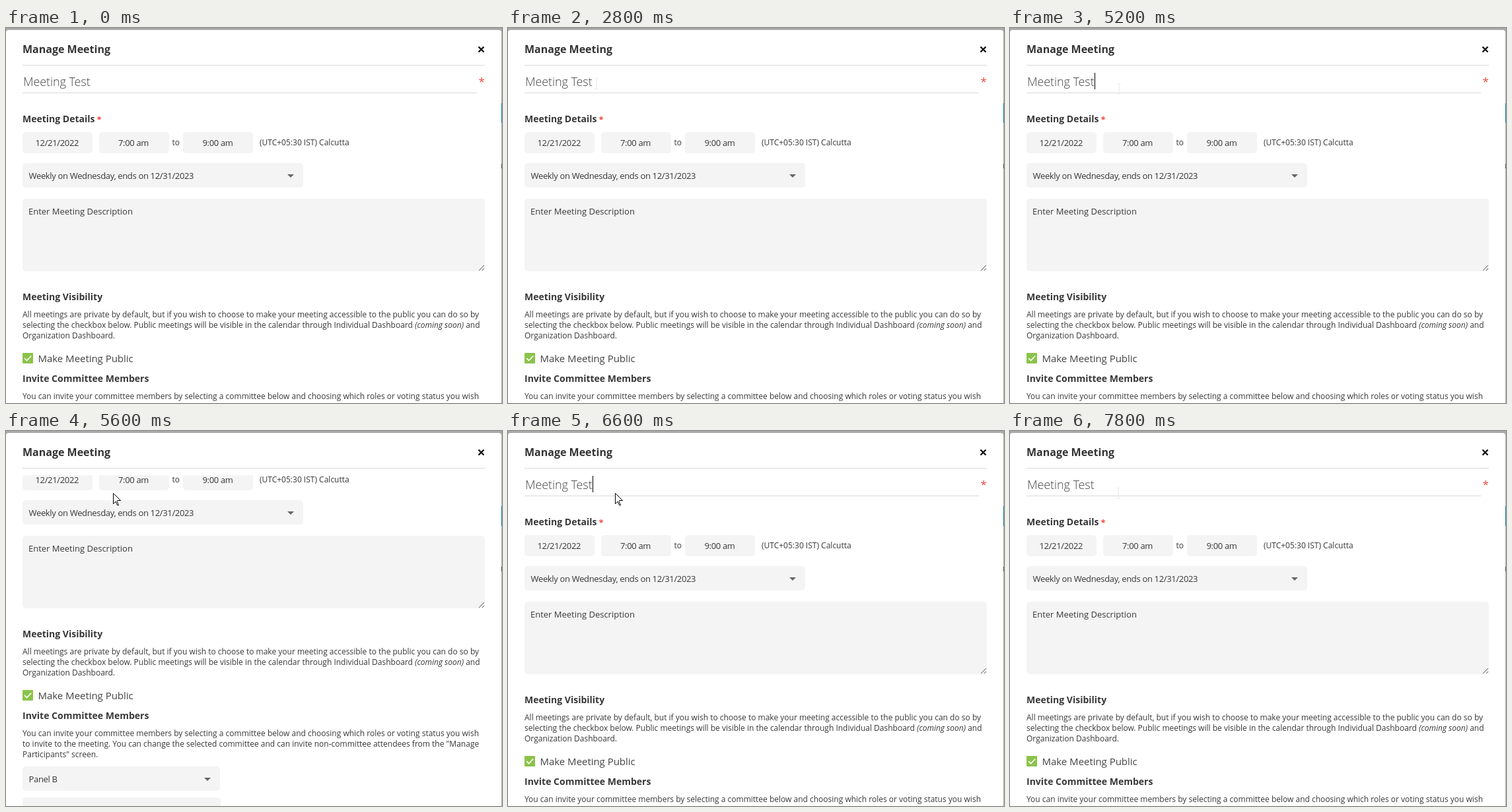
An HTML page that plays this animation: 751x569 px, repeating every 8000 ms.

```html
<!DOCTYPE html>
<html lang="en">
<head>
<meta charset="utf-8">
<title>Manage Meeting</title>
<style>
html, body { margin: 0; width: 100%; height: 100%; overflow: hidden; background: #fff; }
svg { display: block; width: 751px; height: 569px; }
text { font: 12px "Open Sans", sans-serif; fill: #383838; white-space: pre; }
.title { font-size: 16px; font-weight: 700; fill: #333; }
.head { font-size: 14px; font-weight: 700; fill: #383838; }
.name { font-size: 18px; font-weight: 300; letter-spacing: -.08px; fill: #444; }
.value { font-size: 13px; letter-spacing: -.34px; }
.hint { font-size: 13px; }
.option { font-size: 15px; letter-spacing: -.03px; fill: #444; }
.star { fill: #f0483e; }
.field { fill: #f4f4f4; }
.rule { fill: #d9d9de; }

#page, #caret, #arrow, #beam { animation: 8s step-end infinite; }
#page { animation-name: scroll; }
#caret { animation-name: caret; }
#arrow { animation-name: arrow; }
#beam { animation-name: beam; }

@keyframes scroll {
  0% { transform: translateY(0); }
  66.25% { transform: translateY(-20px); }
  67.5% { transform: translateY(-60px); }
  68.75% { transform: translateY(-90px); }
  70% { transform: translateY(-100px); }
  77.5% { transform: translateY(-19px); }
  82.5%, 100% { transform: translateY(0); }
}
@keyframes caret {
  0% { opacity: 0; }
  61.25% { opacity: 1; }
  97.5%, 100% { opacity: 0; }
}
@keyframes arrow {
  0% { opacity: 0; transform: translate(72px, 32px); }
  1.25% { opacity: 1; transform: translate(72px, 32px); }
  2.5% { opacity: 0; transform: translate(72px, 32px); }
  6.25% { opacity: 1; transform: translate(68px, 36px); }
  7.5% { opacity: 0; transform: translate(68px, 36px); }
  22.5% { opacity: 1; transform: translate(112px, 46px); }
  23.75% { opacity: 1; transform: translate(116px, 64px); }
  25% { opacity: 1; transform: translate(119px, 80px); }
  26.25% { opacity: 0; transform: translate(119px, 80px); }
  66.25% { opacity: 1; transform: translate(162px, 94px); }
  88.75%, 100% { opacity: 0; transform: translate(162px, 94px); }
}
@keyframes beam {
  0% { opacity: 0; transform: translate(72px, 32px); }
  2.5% { opacity: 1; transform: translate(72px, 32px); }
  6.25% { opacity: 0; transform: translate(68px, 36px); }
  7.5% { opacity: 1; transform: translate(54px, 34px); }
  8.75% { opacity: 1; transform: translate(42px, 33px); }
  10% { opacity: 1; transform: translate(36px, 32px); }
  15% { opacity: 1; transform: translate(64px, 32px); }
  16.25% { opacity: 1; transform: translate(104px, 32px); }
  17.5% { opacity: 1; transform: translate(130px, 32px); }
  21.25% { opacity: 1; transform: translate(110px, 36px); }
  22.5% { opacity: 0; transform: translate(110px, 36px); }
  26.25% { opacity: 1; transform: translate(134px, 84px); }
  61.25% { opacity: 1; transform: translate(171px, 82px); }
  62.5% { opacity: 1; transform: translate(170px, 84px); }
  63.75% { opacity: 1; transform: translate(168px, 88px); }
  65% { opacity: 1; transform: translate(165px, 92px); }
  66.25% { opacity: 0; transform: translate(164px, 94px); }
  88.75%, 100% { opacity: 1; transform: translate(164px, 94px); }
}
</style>
</head>
<body>
<svg viewBox="0 0 751 569" xmlns="http://www.w3.org/2000/svg">
  <defs>
    <clipPath id="view"><rect y="67" width="749" height="502"/></clipPath>
    <path id="drop" d="M0 0h10l-5 5z" fill="#666"/>
  </defs>

  <!-- dimmed backdrop and dialog -->
  <rect width="751" height="569" fill="#a9a9a9"/>
  <rect x="750" y="114" width="1" height="30" fill="#087b8c"/>
  <rect x="750" y="206" width="1" height="7" fill="#444"/>
  <path d="M0 569V7q0-4 4-4h742q4 0 4 4v562z" fill="#fff"/>

  <text class="title" x="25" y="38">Manage Meeting</text>
  <path d="M715.5 28.5l8 8m0-8l-8 8" stroke="#111" stroke-width="2.4"/>
  <rect class="rule" x="25" y="56" width="700" height="1"/>

  <g clip-path="url(#view)">
    <g id="page">
      <text class="name" x="26" y="88">Meeting Test</text>
      <rect id="caret" x="128" y="68" width="1" height="25" fill="#000"/>
      <rect class="rule" x="25" y="98" width="688" height="1"/>
      <text class="star" x="715.5" y="87" style="font-size:17px">*</text>

      <text class="head" x="25" y="143">Meeting Details</text>
      <text class="star" x="137.5" y="144" style="font-size:13px;font-weight:700">*</text>

      <rect class="field" x="25" y="158" width="106" height="32" rx="5"/>
      <rect class="field" x="141" y="158" width="106" height="32" rx="5"/>
      <rect class="field" x="268" y="158" width="106" height="32" rx="5"/>
      <text class="value" x="44.5" y="179">12/21/2022</text>
      <text class="value" x="170" y="179">7:00 am</text>
      <text x="251.5" y="178">to</text>
      <text class="value" x="297.5" y="179">9:00 am</text>
      <text x="384" y="178">(UTC+05:30 IST) Calcutta</text>

      <rect class="field" x="25" y="205" width="425" height="37" rx="5"/>
      <text class="value" x="34.5" y="229">Weekly on Wednesday, ends on 12/31/2023</text>
      <use href="#drop" x="426" y="222"/>

      <rect class="field" x="25" y="259" width="700" height="110" rx="5"/>
      <text class="hint" x="34" y="283">Enter Meeting Description</text>
      <path d="M716 368l8-8m-3 8l3-3" stroke="#555" fill="none"/>

      <text class="head" x="25" y="413">Meeting Visibility</text>
      <text x="25" y="439">All meetings are private by default, but if you wish to choose to make your meeting accessible to the public you can do so by</text>
      <text x="25" y="455">selecting the checkbox below. Public meetings will be visible in the calendar through Individual Dashboard <tspan font-style="italic">(coming soon)</tspan> and</text>
      <text x="25" y="471">Organization Dashboard.</text>

      <rect x="25" y="493" width="16" height="16" rx="1" fill="#8bc34a"/>
      <path d="M28 501l3.5 3.5 6.8-7" stroke="#fff" stroke-width="1.6" fill="none"/>
      <text class="option" x="48.5" y="507">Make Meeting Public</text>

      <text class="head" x="25" y="537">Invite Committee Members</text>
      <text x="25" y="563">You can invite your committee members by selecting a committee below and choosing which roles or voting status you wish</text>
      <text x="25" y="579">to invite to the meeting. You can change the selected committee and can invite non-committee attendees from the "Manage</text>
      <text x="25" y="595">Participants" screen.</text>

      <rect class="field" x="25" y="609" width="299" height="37" rx="5"/>
      <text class="value" x="34.5" y="633">Panel B</text>
      <use href="#drop" x="300" y="626"/>
      <rect class="field" x="25" y="656" width="300" height="37" rx="5"/>
    </g>
  </g>

  <path id="beam" d="M-2.5-7.5h2m1 0h2M-2.5 8.5h2m1 0h2M0-7v15" stroke="#e6e6e6" fill="none"/>
  <path id="arrow" d="M.5.5v16L4 13l2.5 5.5h2L6 12.5l.5-1h5z" fill="#fff" stroke="#000"/>
</svg>
</body>
</html>
```
